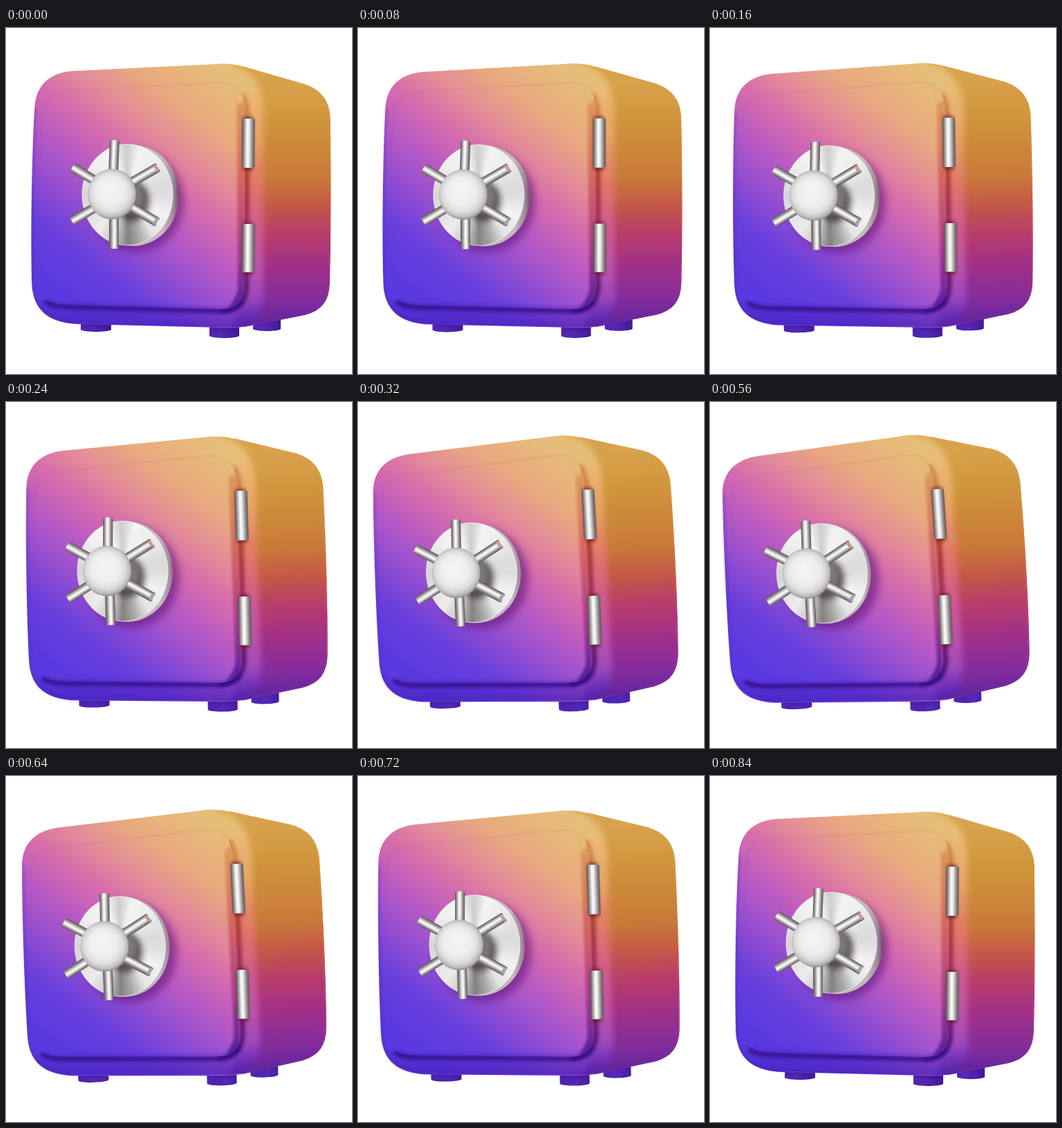
Animation of 500x500 px, one loop 1000 ms. Source, as an HTML page with a canvas:

```html
<!DOCTYPE html>
<html lang="en">
<head>
<meta charset="utf-8">
<title>Safe</title>
<style>
  html, body { margin: 0; width: 100%; height: 100%; overflow: hidden; background: #fff; }
  canvas { display: block; width: 100vw; height: 100vh; }
</style>
</head>
<body>
<canvas id="stage" width="500" height="500"></canvas>
<script>
const ctx = document.getElementById('stage').getContext('2d');
let lean = 0;

// Leans the safe to the left while its feet stay almost in place.
function warp(x, y) {
  const s = (440 - y) / 360;
  return [
    x - lean * (5.5 + 13 * s + 12.5 * s * s),
    y + lean * 0.078 * (283 - x) * (0.5 + 0.85 * s)
  ];
}

const shape = d => new Path2D(
  d.replace(/(-?[\d.]+) (-?[\d.]+)/g, (m, x, y) => warp(+x, +y).join(' ')));

function oval(cx, cy, rx, ry) {
  const path = new Path2D();
  for (let i = 0; i < 72; i++) {
    const a = i * Math.PI / 36;
    path.lineTo(...warp(cx + rx * Math.cos(a), cy + ry * Math.sin(a)));
  }
  path.closePath();
  return path;
}

function addStops(g, stops) {
  stops.forEach(([at, color]) => g.addColorStop(at, color));
  return g;
}

const ramp = (x1, y1, x2, y2, stops) =>
  addStops(ctx.createLinearGradient(...warp(x1, y1), ...warp(x2, y2)), stops);

function fill(path, paint, blur = 0) {
  ctx.filter = blur ? `blur(${blur}px)` : 'none';
  ctx.fillStyle = paint;
  ctx.fill(path);
  ctx.filter = 'none';
}

function stroke(path, paint, width, blur = 0) {
  ctx.filter = blur ? `blur(${blur}px)` : 'none';
  ctx.strokeStyle = paint;
  ctx.lineWidth = width;
  ctx.stroke(path);
  ctx.filter = 'none';
}

function within(path, draw) {
  ctx.save();
  ctx.clip(path);
  draw();
  ctx.restore();
}

const FRONT = [[0, '#5a3ae0'], [.15, '#693fdc'], [.3, '#974fd0'], [.42, '#b85ac4'],
  [.55, '#d66bad'], [.66, '#e2899a'], [.8, '#e8a980'], [1, '#e6be78']];
const SIDE = [[0, '#d8a24c'], [.16, '#d0963c'], [.4, '#c97a38'], [.52, '#c45848'],
  [.64, '#b73c6b'], [.77, '#a03088'], [.9, '#862d9c'], [1, '#64259c']];
const FRAME = [[0, '#ebbd74'], [.22, '#e8a568'], [.42, '#e0766a'], [.6, '#d05a90'],
  [.77, '#b954ae'], [.92, '#9445bd'], [1, '#6c32b8']];
const STEEL = [[0, '#574e4c'], [.18, '#a09a99'], [.4, '#fbfbfb'], [.55, '#ebebeb'],
  [.8, '#928b8b'], [1, '#5e5555']];

const frontPaint = () => ramp(70, 370, 310, 60, FRONT);

function tube(x1, y1, x2, y2, width, tip) {
  const a = warp(x1, y1), b = warp(x2, y2);
  const len = Math.hypot(b[0] - a[0], b[1] - a[1]);
  ctx.save();
  ctx.translate(...a);
  ctx.rotate(Math.atan2(b[1] - a[1], b[0] - a[0]));
  const path = new Path2D();
  path.roundRect(0, -width / 2, len, width, 2);
  fill(path, addStops(ctx.createLinearGradient(0, width / 2, 0, -width / 2), STEEL));
  if (tip) {
    const cap = new Path2D();
    cap.ellipse(3, 0, 2.5, width / 2 - 1, 0, 0, 7);
    fill(cap, tip);
  }
  ctx.restore();
}

function foot(x1, x2, top, bottom) {
  const b = bottom - 3;
  const path = shape(`M ${x1} ${top} L ${x1} ${b} C ${x1 + 4} ${bottom + 1} ${x2 - 4} ${bottom + 1} ${x2} ${b} L ${x2} ${top} Z`);
  fill(path, ramp(x1, 0, x2, 0, [[0, '#4d24b2'], [.35, '#5528b8'], [1, '#421896']]));
  within(path, () => fill(oval((x1 + x2) / 2, top, (x2 - x1) / 2 + 4, 11), 'rgba(40,8,100,.6)', 3));
}

function drawBody() {
  foot(108, 152, 418, 439);
  foot(294, 337, 424, 448);
  foot(357, 397, 412, 438);

  const right = `M 345 57 L 432 82 C 455 90 467 106 468 130
    C 469 210 469 300 467 370 C 466 395 455 408 432 414 L 345 431`;
  const body = shape(`${right} C 330 433 315 433 300 432 L 100 427 C 62 424 40 408 38 370
    C 36 300 38 180 42 115 C 44 84 62 66 95 63 L 300 53 C 320 51 332 53 345 57 Z`);
  const side = shape(`M 325 30 L 490 30 L 490 450 L 330 450 L 330 434
    C 356 431 371 418 372 392 L 372 115 C 371 80 350 56 325 53 Z`);
  const sidePaint = ramp(420, 75, 420, 425, SIDE);
  const edge = 1.5 + 2 * lean;

  stroke(body, frontPaint(), edge);
  stroke(shape(right), sidePaint, edge);
  fill(body, frontPaint());
  within(body, () => {
    fill(shape('M 342 90 L 385 90 L 385 445 L 325 445 L 342 380 Z'),
      ramp(358, 80, 358, 430, FRAME), 4);
    fill(body, ramp(200, 385, 200, 432, [[0, 'rgba(65,20,185,0)'], [1, 'rgba(65,20,165,.55)']]));
    stroke(shape('M 100 427 C 62 424 40 408 38 370 C 36 300 38 180 42 115'),
      'rgba(75,35,180,.3)', 5, 2);
    fill(side, sidePaint, 4);
  });
}

function drawDoor() {
  const start = 'M 50 372 C 47 300 48 200 52 125 C 54 103 66 94 85 92';
  const end = 'L 85 399 C 62 397 51 392 50 372 Z';
  const rim = 345 - 3 * lean;
  const door = shape(`${start} L 305 79 C 333 77 ${rim} 91 ${rim} 115 L ${rim - 1} 374 C ${rim - 2} 397 331 406 310 406 ${end}`);
  const panel = shape(`${start} L 298 79 C 321 78 331 91 331 112 L 333 374 C 332 394 321 403 304 403 ${end}`);

  stroke(shape('M 341 96 C 348 108 348 120 348 130 L 347 376 C 345 398 332 408 310 408'),
    ramp(0, 90, 0, 405, [[0, 'rgba(190,100,45,.45)'], [.35, 'rgba(165,50,38,.85)'],
      [.65, 'rgba(140,30,85,.85)'], [1, 'rgba(66,15,118,.95)']]), 8, 2.5);
  stroke(shape('M 56 394 C 66 402 75 402 90 403 L 310 409 C 325 409 335 403 341 394'),
    'rgba(52,15,135,.9)', 7, 2.5);
  fill(door, frontPaint());
  within(door, () => {
    fill(shape('M 325 80 L 334 112 L 350 100 L 350 410 L 320 410 L 334 380 L 333 112 Z'),
      ramp(0, 80, 0, 405, [[0, 'rgba(215,145,70,.6)'], [.45, 'rgba(205,80,85,.75)'],
        [.75, 'rgba(155,50,140,.8)'], [1, 'rgba(80,28,150,.9)']]), 2);
    fill(panel, frontPaint(), 2);
    stroke(shape('M 62 392 C 70 399 78 399 90 399 L 310 406 C 330 405 341 397 343 380'),
      'rgba(75,30,185,.5)', 5, 2);
  });
  stroke(shape('M 50 372 C 47 300 48 200 52 125 C 54 103 66 94 85 92 L 305 79 C 330 78 341 88 344 106'),
    'rgba(155,65,125,.14)', 1.6, .8);
}

function drawPlate() {
  fill(oval(188, 250, 69, 74), 'rgba(100,22,120,.6)', 6);
  // The rim shows less as the plate turns towards the viewer.
  fill(oval(184 - 5 * lean, 242, 66, 73),
    ramp(130, 0, 250, 0, [[0, '#aaa'], [.8, '#c4bcbf'], [.93, '#a18d98'], [1, '#6f4c66']]));
  const disc = oval(175.5, 241, 65.5, 73);
  const conic = addStops(ctx.createConicGradient(0, ...warp(176, 241)), [
    [0, '#dedede'], [.08, '#f2f2f2'], [.16, '#e5e5e5'], [.21, '#a9a6a6'], [.25, '#858181'],
    [.29, '#c5c3c3'], [.36, '#ececec'], [.5, '#d5d5d5'], [.62, '#efefef'], [.7, '#f5f5f5'],
    [.745, '#cdcdcd'], [.79, '#f3f3f3'], [.87, '#ececec'], [.95, '#dcdcdc'], [1, '#dedede']]);
  fill(disc, conic);
  stroke(disc, 'rgba(255,255,255,.5)', 1.2, .5);
  within(disc, () => {
    fill(oval(183, 250, 24, 29), 'rgba(55,48,50,.8)', 5);
    fill(oval(177, 244, 22, 24), '#7d7878', 3);
  });
}

function drawHandle() {
  tube(157, 162, 155, 215, 14);
  tube(156, 319, 156, 265, 14);
  tube(96, 201, 136, 225, 14);
  tube(95, 279, 136, 255, 14);
  tube(220, 201, 175, 227, 14, '#c99b92');
  tube(219, 281, 175, 255, 14, '#aaa4a4');
  const [x, y] = warp(153, 240);
  const ball = new Path2D();
  ball.ellipse(x, y, 35, 36.5, 0, 0, 7);
  fill(ball, addStops(ctx.createRadialGradient(x - 4, y - 7, 4, x - 1, y - 1, 37), [
    [0, '#f5f5f5'], [.5, '#ededed'], [.75, '#dcdcdc'], [.91, '#bebcbc'], [1, '#969292']]));
}

function hinge(top, bottom) {
  fill(shape(`M 342 ${top - 3} L 357 ${top - 3} L 357 ${bottom + 4} L 342 ${bottom + 4} Z`),
    'rgba(95,20,35,.6)', 2);
  tube(350.5 - lean, top, 350 - lean, bottom, 18.5);
}

const ease = u => Math.pow(u, 1.7);

function pose(t) {
  if (t < 400) return ease(t / 400);
  if (t < 840) return 1 - ease((t - 400) / 440);
  return 0;
}

function frame(now) {
  lean = pose(Math.floor(now % 1000 / 40) * 40);
  ctx.fillStyle = '#fff';
  ctx.fillRect(0, 0, 500, 500);
  drawBody();
  drawDoor();
  drawPlate();
  drawHandle();
  hinge(131, 202);
  hinge(283, 353);
  requestAnimationFrame(frame);
}
frame(performance.now());
</script>
</body>
</html>
```
